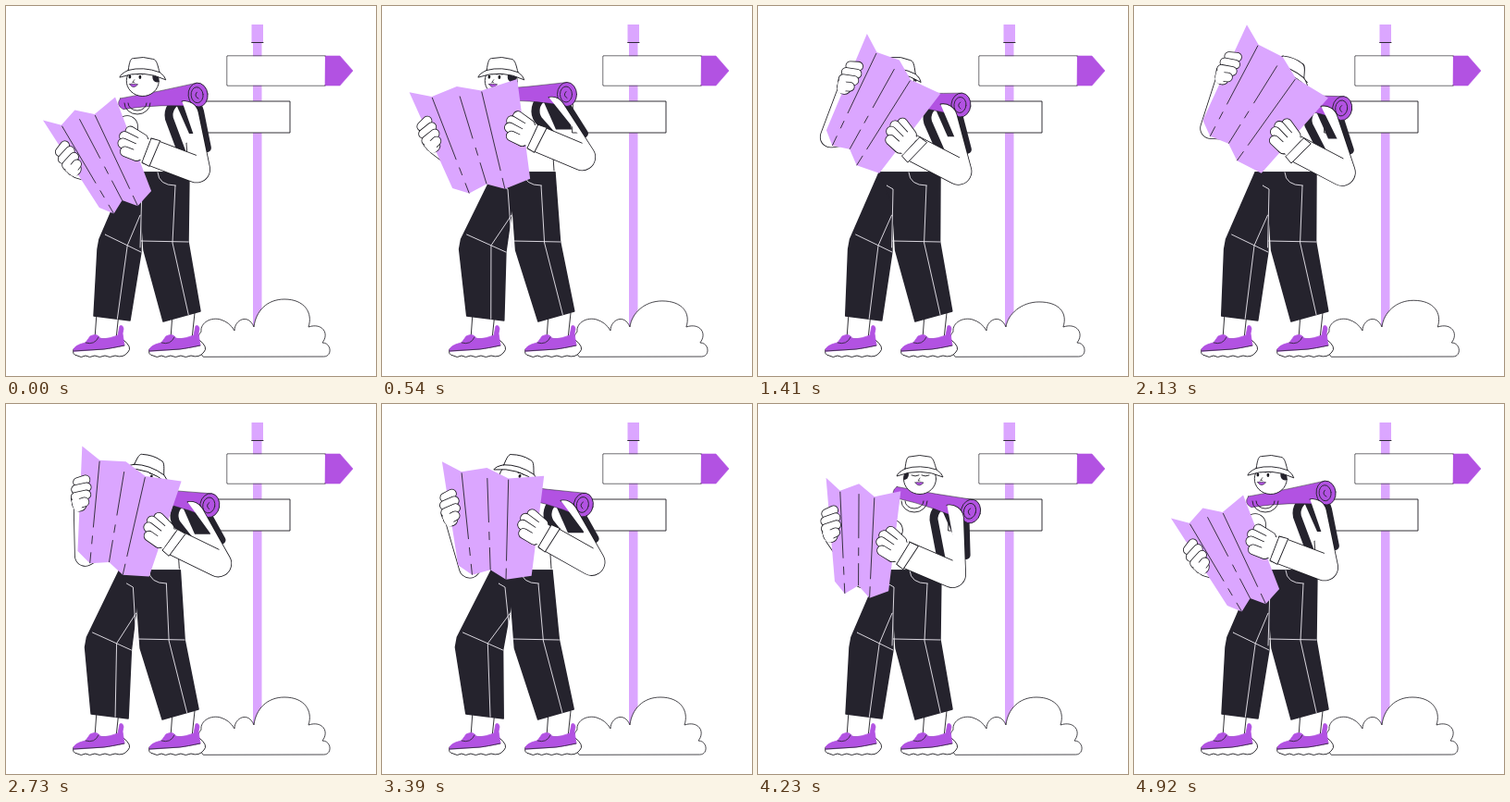
Animation, 400 px wide and 400 px high, one loop 4950 ms. Source, as an HTML page with a canvas:

```html
<!DOCTYPE html>
<html>
<head>
<meta charset="utf-8">
<style>
html, body { margin: 0; width: 100%; height: 100%; overflow: hidden; background: #fff; }
canvas { display: block; }
</style>
</head>
<body>
<canvas id="stage" width="400" height="400"></canvas>
<script>
const c = document.getElementById('stage').getContext('2d');
const LIGHT = '#dba6ff', PURPLE = '#b252e2', DARK = '#25232d', INK = '#1b1a20', WHITE = '#fff';
const LOOP = 4950, RAD = Math.PI / 180;

const smooth = p => p * p * (3 - 2 * p);
const easeIn = p => p * p * (2 - p);
const easeOut = p => p * (2 - p);

// Key poses; each one moves on to the next between `from` and `to`.
const keys = [
  { from: 0, to: 520, ease: smooth, map: [104, 160], turn: -27, width: 81, hip: 198, shoulder: 193, lean: -6, head: 148, tilt: 2, look: -9 },
  { from: 800, to: 1410, ease: easeIn, map: [103, 139], turn: -16, width: 116, hip: 187, shoulder: 183, lean: 0, head: 129, tilt: 2, look: -8 },
  { from: 1410, to: 1700, ease: easeOut, map: [130, 110], turn: 30, width: 101, hip: 197, shoulder: 200, lean: 6, head: 152, tilt: 8, look: 13 },
  { from: 2150, to: 3100, ease: smooth, map: [136, 106], turn: 33, width: 117, hip: 197, shoulder: 205, lean: 8, head: 166, tilt: 22, look: 14 },
  { from: 3700, to: 4230, ease: smooth, map: [121, 125], turn: -1, width: 110, hip: 184, shoulder: 196, lean: 12, head: 146, tilt: 16, look: 9 },
  { from: 4290, to: 4920, ease: smooth, map: [113, 142], turn: 1, width: 81, hip: 198, shoulder: 207, lean: 15, head: 175, tilt: 0, look: 0 }
];

const mix = (a, b, k) => Array.isArray(a) ? a.map((v, i) => mix(v, b[i], k)) : a + (b - a) * k;
const off = (p, x, y) => [p[0] + x, p[1] + y];
const polar = (p, r, a) => [p[0] + r * Math.cos(a), p[1] + r * Math.sin(a)];
const heading = (a, b) => Math.atan2(b[1] - a[1], b[0] - a[0]);

function poseAt(t) {
  let i = keys.length - 1;
  while (t < keys[i].from) i--;
  const a = keys[i], b = keys[(i + 1) % keys.length];
  const k = a.ease(Math.min(1, (t - a.from) / (a.to - a.from)));
  const p = {};
  for (const name of ['map', 'turn', 'width', 'hip', 'shoulder', 'lean', 'head', 'tilt', 'look']) {
    p[name] = mix(a[name], b[name], k);
  }
  p.joint = [p.shoulder, 118 + .45 * (p.shoulder - 193)];
  p.open = Math.min(1, Math.abs(t - 4240) / 200);
  return p;
}

function paint(fill, stroke, width = .9) {
  if (fill) { c.fillStyle = fill; c.fill(); }
  if (stroke) { c.strokeStyle = stroke; c.lineWidth = width; c.stroke(); }
}
function poly(pts, fill, stroke, width) {
  c.beginPath();
  pts.forEach(p => c.lineTo(...p));
  c.closePath();
  paint(fill, stroke, width);
}
function line(pts, stroke = INK, width = .9) {
  c.beginPath();
  pts.forEach(p => c.lineTo(...p));
  paint(null, stroke, width);
}
function path(d, fill, stroke, width = .9) {
  const shape = new Path2D(d);
  if (fill) { c.fillStyle = fill; c.fill(shape); }
  if (stroke) { c.strokeStyle = stroke; c.lineWidth = width; c.stroke(shape); }
}
function ellipse(x, y, rx, ry, fill, stroke) {
  c.beginPath();
  c.ellipse(x, y, rx, ry, 0, 0, 7);
  paint(fill, stroke);
}
function limb(pts, width) {
  line(pts, INK, width + 1.6);
  line(pts, WHITE, width);
}
function local([x, y], angle, draw) {
  c.save();
  c.translate(x, y);
  c.rotate(angle);
  draw();
  c.restore();
}
// Elbow between two ends, given the lengths of both bones.
function elbowOf(a, b, upper, lower) {
  const d = Math.min(Math.hypot(b[0] - a[0], b[1] - a[1]), upper + lower);
  const bend = Math.acos((upper * upper + d * d - lower * lower) / (2 * upper * d));
  return polar(a, upper, heading(a, b) - bend);
}
// Place on the turned sheet, measured from its centre.
function onMap(p, x, y) {
  const a = p.turn * RAD;
  return off(p.map, x * Math.cos(a) - y * Math.sin(a), x * Math.sin(a) + y * Math.cos(a));
}
// u runs across the sheet, v down it; the foot is narrower than the top.
function sheetPoint(p, u, v, fold = 0) {
  const x = (u - .5) * p.width * (1 - .28 * v);
  return onMap(p, x, 110 * v - 55 + .16 * x + fold);
}

function signpost() {
  c.fillStyle = LIGHT;
  c.fillRect(267, 38, 9.5, 315);
  c.fillRect(265.5, 20, 12.5, 20);
  line([[265.5, 39.5], [278, 39.5]]);
  poly([[345, 54], [361, 54], [375, 70], [361, 86], [345, 86]], PURPLE, PURPLE, .6);
  line([[345, 54], [239, 54], [239, 86], [345, 86]]);
  c.fillStyle = WHITE;
  c.fillRect(239.4, 54.4, 105, 31.2);
  poly([[206, 103], [307, 103], [307, 137], [206, 137]], WHITE, INK);
}

function bush(t) {
  const r = 3 * Math.max(0, Math.sin(2 * Math.PI * t / LOOP));
  path(`M213 379C205 370 205 359 211 352C210 342 222 336 232 339Q242 342 247 351
    C247 339 262 332 268 347C270 ${330 + r} ${282 + r} ${317 + r} ${301 + r} ${317 + r}
    C${323 + r} ${317 + r} ${332 + r} 332 ${327 + r} 347
    C${342 + r} 342 ${350 + r} 354 ${342 + r} 364C${352 + r} 364 ${353 + r} 379 ${344 + r} 379Z`, WHITE, INK, .8);
}

function shoe(x) {
  local([x, 0], 0, () => {
    path('M26 332L24 360H47L50 332Z', WHITE, INK);
    path('M1 371Q-1 377 5 378Q9 381 14 378Q18 381 24 378Q29 381 35 378Q40 381 46 378Q55 381 60 374Q65 369 55 361Z', WHITE, INK);
    path('M1 373Q0 367 14 364L19 357Q25 354 28 357Q30 363 49 356L51 346Q54 344 55 349L54 354L56 367Q42 370 34 371Z', PURPLE, PURPLE, .8);
    path('M14 364Q24 367 28 358M1 373L34 371Q42 370 56 367', null, DARK, .8);
  });
}

function trousers(hip) {
  const seam = '#eeeaf2', shift = hip - 198;
  // The feet stay put, so each point follows the hips by its own share.
  const at = (x, y, share) => [x + shift * share, y];
  const waist = at(132, 180, 1), crotch = at(146, 216, .45), top = at(198, 180, 1);
  const knee = at(101, 252, 1.4), hem = at(95, 335, .3), hemIn = at(134, 340, .2), inner = at(146, 266, 1.1);
  const knee2 = at(197, 255, .4), hem2 = at(210, 330, .2), hemIn2 = at(170, 341, .1), inner2 = at(149, 264, .4);
  poly([waist, knee, off(knee, -2, 11), hem, hemIn, inner, crotch, top], DARK, DARK, 1.5);
  poly([waist, top, knee2, hem2, hemIn2, inner2, crotch], DARK, DARK, 1.5);

  const shin = mix(off(knee, 4, -6), inner, .64), shin2 = off(knee2, -17, 1);
  line([off(knee, 6, -5), inner], seam);
  line([off(inner2, -3, -10), knee2], seam);
  line([off(top, -58, 14), off(top, -51, 18), off(inner2, -4, -3)], seam);
  line([off(crotch, -1, 10), shin, mix(hem, hemIn, .65)], seam);
  line([off(top, -15, 14), shin2, mix(hem2, hemIn2, .32)], seam);
  c.beginPath();
  c.moveTo(...off(top, -34, 0));
  c.quadraticCurveTo(...off(top, -33, 14), ...off(top, -15, 14));
  paint(null, seam);
}

function torso({ joint, hip, head }) {
  poly([[head - 20, 107], [head + 10, 105], off(joint, 0, -12), [hip - 2, 150], [hip, 179], [hip - 66, 180]], WHITE);
  line([[hip - 3, 148], [hip - 1, 178]]);
}

function backpack(joint, upper) {
  const out = upper - Math.PI / 2;
  poly([off(joint, -10, -14), off(joint, 18, -14), off(joint, 22, 20), off(joint, 5, 20)], DARK);
  c.beginPath();
  c.moveTo(...polar(polar(joint, 44, upper), -11, out));
  c.arc(...joint, 17, out - Math.PI, out);
  c.lineTo(...polar(polar(joint, 40, upper), 16, out));
  paint(null, DARK, 9);
}

function bedroll({ joint, lean }) {
  local(off(joint, 17 + .4 * lean, .65 * lean - 18), lean * RAD, () => {
    path('M-84 -5Q-40 -8 0 -13V13Q-40 5 -82 7Q-90 2 -84 -5Z', PURPLE, DARK, .5);
    ellipse(0, 0, 10.5, 13, PURPLE, DARK);
    ellipse(-1, 0, 6.5, 8.5, null, DARK);
    path('M-1 -3q-4 4 1 7', null, DARK);
  });
}

function head({ head: x, tilt, look, open }) {
  for (const r of [10, 14]) {
    c.beginPath();
    c.ellipse(x - 6, 105, r, r - 2, 0, 0, Math.PI);
    paint(null, INK);
  }
  local([x, 74], tilt * RAD, () => {
    ellipse(0, 7, 17.5, 16.5, WHITE, INK);
    c.save();
    c.clip();
    ellipse(-17 - look * 3.6, 2, 5, 6, DARK);
    c.restore();
    for (const ex of [look - 5, look + 6]) {
      if (open > .35) {
        ellipse(ex, 3, 1.4, 2.1 * open, INK);
        path(`M${ex - 3} 0q3 -2 6 0`, null, INK);
      } else path(`M${ex - 4} 3q4 2 8 0`, null, INK);
    }
    path(`M${look} 6l-2 3h2`, null, INK, .7);
    path(`M${look - 5} 11q3 -1 4 0q2 -1 5 0q-5 6 -9 0Z`, PURPLE, DARK, .6);
    path('M-16 -4C-15 -13 -14 -17 -11 -17Q0 -20 10 -17C15 -17 16 -8 18 -3Q24 1 25 5Q0 -6 -25 4Q-24 0 -16 -4Z', WHITE, INK);
    path('M-16 -4Q0 -9 18 -3', null, INK);
  });
}

function sheet(p) {
  const across = [0, .19, .44, .65, 1], zigzag = u => (u === .19 || u === .65) ? 900 / p.width : 0;
  const top = across.map(u => sheetPoint(p, u, 0, zigzag(u)));
  const bottom = across.map(u => sheetPoint(p, u, 1, zigzag(u)));
  poly([...top, ...bottom.slice().reverse()], LIGHT);
  c.lineCap = 'butt';
  [[72, 9, 9, 9], [48, 10, 9, 8], [88, 8]].forEach((dash, i) => {
    c.setLineDash(dash);
    line([mix(top[i + 1], bottom[i + 1], i === 1 ? .1 : .01), bottom[i + 1]], DARK);
  });
  c.setLineDash([]);
  c.lineCap = 'round';
}

function farArm(p, hand, angle) {
  const shoulder = off(p.joint, -62, 12), wrist = polar(hand, 15, angle + 70 * RAD);
  limb([shoulder, elbowOf(shoulder, wrist, 60, 53), wrist], 22);
}

function farHand(hand, angle) {
  local(hand, angle, () => {
    limb([[-2, 6], [0, 12]], 14);
    for (let i = 0; i < 4; i++) {
      const y = -13 + 8 * i, bulge = 3 * Math.sin((i + .5) / 4 * Math.PI);
      limb([[-2 - bulge, y + 1], [4 + bulge, y - 2]], 9);
    }
    line([[-4, 9], [-2, 15]], WHITE, 9);
  });
}

function nearArm(joint, elbow, wrist, upper, angle) {
  const lower = heading(elbow, wrist), under = lower - Math.PI / 2;
  const inner = polar(elbow, -14, under);
  c.beginPath();
  c.arc(...joint, 15, -100 * RAD, upper - Math.PI / 2);
  c.arc(...elbow, 14, upper - Math.PI / 2, under);
  c.lineTo(...polar(wrist, 14, under));
  paint(null, INK, 1.6);
  c.lineTo(...polar(wrist, -14, under));
  c.lineTo(...inner);
  paint(WHITE);
  line([polar(wrist, -14, under), polar(inner, 6, lower)]);

  local(wrist, angle, () => {
    limb([[-10, -6], [-10, 6]], 17);
    for (let i = 0; i < 4; i++) {
      const reach = 20 + 9 * Math.sin((i + .7) / 4 * Math.PI);
      limb([[-9, -10 + 6.5 * i], [-reach, -13 + 7.5 * i]], 10);
    }
    poly([[-1, -14], [9, -15], [8, 15], [-1, 14]], WHITE, INK);
    c.fillStyle = WHITE;
    c.fillRect(-14, -12, 12.5, 24);
  });
}

function draw(t) {
  const p = poseAt(t);
  const edge = sheetPoint(p, 0, .45), edgeTurn = heading(edge, sheetPoint(p, 0, 1)) - Math.PI / 2;
  const wrist = onMap(p, 16 + .36 * p.width, 19);
  const elbow = elbowOf(p.joint, wrist, 60, 57), upper = heading(p.joint, elbow);

  c.fillStyle = WHITE;
  c.fillRect(0, 0, 400, 400);
  c.lineJoin = c.lineCap = 'round';
  signpost();
  bush(t);
  shoe(72);
  shoe(154);
  torso(p);
  trousers(p.hip);
  backpack(p.joint, upper);
  bedroll(p);
  head(p);
  farArm(p, edge, edgeTurn);
  sheet(p);
  farHand(edge, edgeTurn);
  nearArm(p.joint, elbow, wrist, upper, (31 + .37 * p.turn) * RAD);
}

const start = performance.now();
function tick() {
  draw((performance.now() - start) % LOOP);
  requestAnimationFrame(tick);
}
tick();
</script>
</body>
</html>
```
